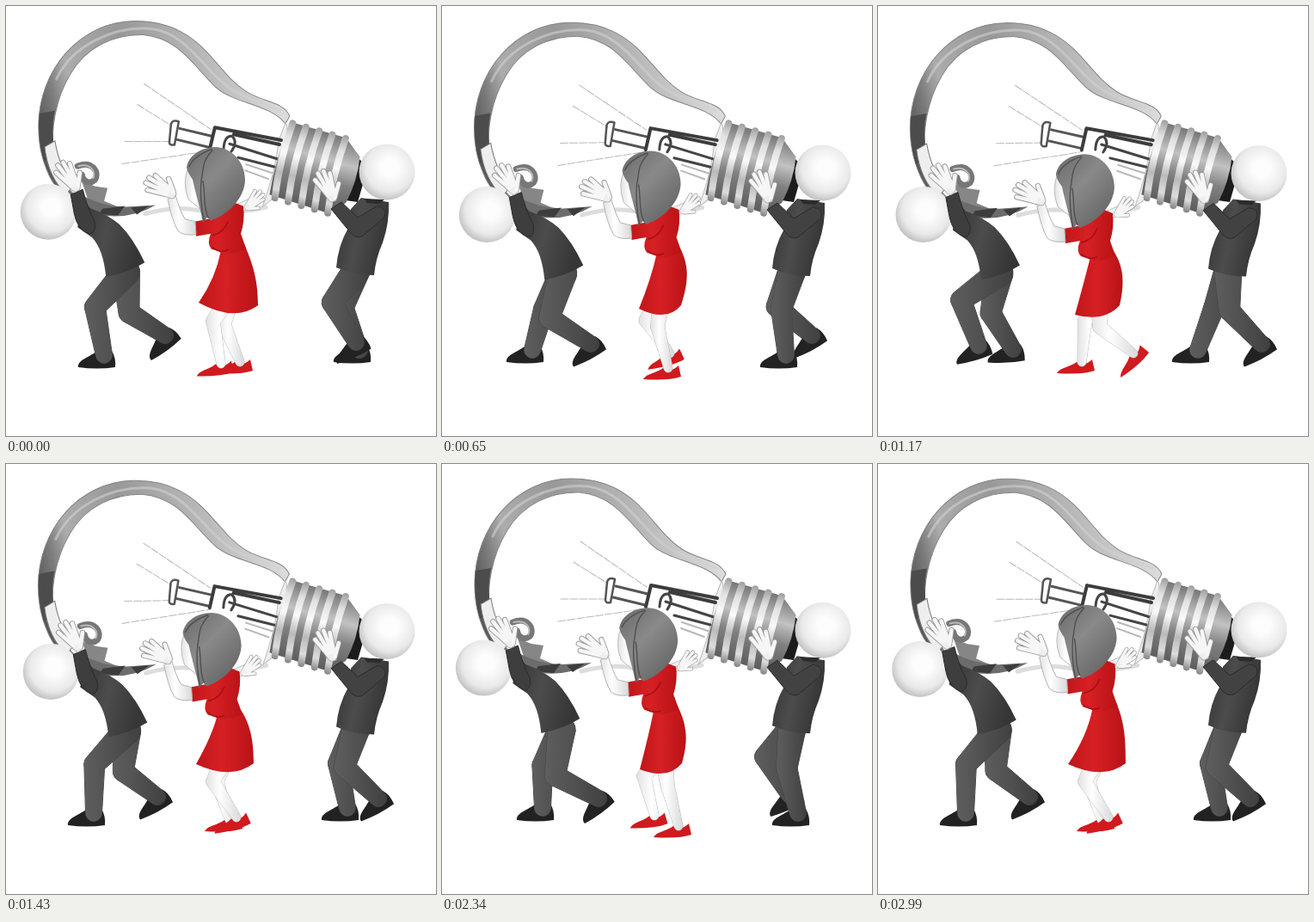
Recreate the animation shown at these times as an HTML page. Size 500 by 500 pixels, loop 3.12 s.

```html
<!DOCTYPE html>
<html>
<head>
<meta charset="utf-8">
<style>
  html, body { margin: 0; width: 100%; height: 100%; overflow: hidden; background: #fff; }
  svg { display: block; width: 100vw; height: 100vh; }
  .line { fill: none; stroke-linecap: round; stroke-linejoin: round; }
</style>
</head>
<body>
<svg viewBox="0 0 500 500">
  <defs>
    <radialGradient id="ball" cx=".55" cy=".42" r=".6">
      <stop offset=".25" stop-color="#fdfdfd"/><stop offset=".72" stop-color="#e9e9e9"/><stop offset="1" stop-color="#bebebe"/>
    </radialGradient>
    <linearGradient id="suit" x2="1" y2=".3">
      <stop stop-color="#333"/><stop offset=".5" stop-color="#4c4c4c"/><stop offset="1" stop-color="#363636"/>
    </linearGradient>
    <linearGradient id="cloth">
      <stop stop-color="#5e5e5e"/><stop offset=".5" stop-color="#505050"/><stop offset="1" stop-color="#404040"/>
    </linearGradient>
    <linearGradient id="skin">
      <stop stop-color="#e2e2e2"/><stop offset=".4" stop-color="#fff"/><stop offset="1" stop-color="#d8d8d8"/>
    </linearGradient>
    <linearGradient id="red">
      <stop stop-color="#c0161a"/><stop offset=".45" stop-color="#d62024"/><stop offset="1" stop-color="#b81216"/>
    </linearGradient>
    <linearGradient id="hair" x2=".8" y2="1">
      <stop stop-color="#6a6a6a"/><stop offset=".45" stop-color="#898989"/><stop offset="1" stop-color="#626262"/>
    </linearGradient>
    <linearGradient id="glass" gradientUnits="userSpaceOnUse" x1="40" y1="170" x2="325" y2="100">
      <stop stop-color="#505050"/><stop offset=".1" stop-color="#7c7c7c"/><stop offset=".18" stop-color="#acacac"/>
      <stop offset=".42" stop-color="#989898"/><stop offset=".7" stop-color="#b6b6b6"/><stop offset="1" stop-color="#dedede"/>
    </linearGradient>
    <linearGradient id="metal" gradientUnits="userSpaceOnUse" x1="0" y1="-48" x2="0" y2="50">
      <stop stop-color="#9a9a9a"/><stop offset=".2" stop-color="#e0e0e0"/><stop offset=".42" stop-color="#fafafa"/>
      <stop offset=".65" stop-color="#bababa"/><stop offset=".85" stop-color="#dcdcdc"/><stop offset="1" stop-color="#828282"/>
    </linearGradient>
    <linearGradient id="groove" gradientUnits="userSpaceOnUse" x1="0" y1="-48" x2="0" y2="50">
      <stop stop-color="#6c6c6c"/><stop offset=".35" stop-color="#c2c2c2"/><stop offset=".6" stop-color="#808080"/><stop offset="1" stop-color="#585858"/>
    </linearGradient>
    <path id="fingers" d="M-3 -4L-10 -25M0 -4L-4 -31M3 -4L3 -31M5 -4L9 -26M4 2L14 -11"/>
    <g id="hand" class="line">
      <use href="#fingers" stroke="#999" stroke-width="6.4"/>
      <path d="M-5 -13Q-7 0 -2 6L4 6Q9 -3 7 -13Z" fill="#eee" stroke="#b0b0b0"/>
      <use href="#fingers" stroke="#f6f6f6" stroke-width="4.6"/>
    </g>
  </defs>

  <g id="bulb">
    <path d="M330 128C323 111 299 112 279 99C250 80 239 48 203 29C188 21 172 17 150 17C88 17 38 72 38 140
      C38 164 43 180 50 196C57 211 70 225 86 233L91 228C73 217 59 195 56 172C51 145 58 106 76 77
      C94 47 126 32 160 33C203 37 220 72 244 94C266 114 308 114 325 137Z" fill="url(#glass)" stroke="#858585"/>
    <path class="line" d="M59 84C77 45 126 22 170 26C214 32 232 79 266 99Q285 109 319 121" stroke="#d0d0d0" stroke-width="3" opacity=".6"/>
    <path d="M39 124Q36 150 44 180L57 170Q52 142 57 121Z" fill="#4c4c4c"/>
    <path d="M45 163L57 156Q62 189 80 206L70 218Q49 199 45 163Z" fill="#eee" stroke="#777"/>
    <path d="M88 203L104 209L118 211L114 226L130 233L98 233Z" fill="#868686"/>
    <path d="M86 218Q112 233 140 233L174 231Q146 247 115 243Q94 239 83 231Z" fill="#6c6c6c"/>
    <path d="M112 235L138 232L130 243L108 241ZM145 234L166 232L152 242Z" fill="#3c3c3c"/>
    <path class="line" d="M162 241Q192 233 215 236Q260 244 302 234" stroke="#ddd" stroke-width="5"/>
    <path d="M325 136Q329 139 325 158L309 225L298 233Q314 190 317 157Z" fill="#eee" stroke="#bbb"/>
    <g class="line" stroke="#b8b8b8">
      <path d="M161 90L238 143M153 114L193 139M138 157L192 157M135 183L238 168" stroke-dasharray="9 2"/>
      <path d="M192 137Q194 131 201 134L196 161Q190 162 190 158Z" stroke="#555" stroke-width="2.5"/>
      <path d="M202 142L239 151M199 155L236 164" stroke="#555" stroke-width="3"/>
      <path d="M237 166L243 141L320 156M265 149L318 161" stroke="#3c3c3c" stroke-width="4"/>
      <path d="M253 166Q254 150 263 151Q270 158 262 169M260 160L316 178M270 176L312 187" stroke="#444" stroke-width="3"/>
      <path d="M279 184L309 194M278 191L305 201" stroke-width="2"/>
    </g>
  </g>

  <g transform="translate(357 188) rotate(16)">
    <path d="M48 -25L61 -18L61 24L47 26Z" fill="#1c1c1c"/>
    <path d="M30 -42L49 -27Q54 0 48 29L30 46Z" fill="url(#groove)"/>
    <path d="M-38 -44Q-46 0 -40 44L30 46L30 -44Z" fill="url(#groove)"/>
    <g id="threads" class="line" stroke="url(#metal)" stroke-width="8"></g>
  </g>

  <g id="legs0"></g>
  <g id="left">
    <path class="line" d="M84 187C101 180 110 194 104 203C97 209 90 204 89 197" stroke="#777" stroke-width="7"/>
    <path class="line" d="M85 187C99 183 106 194 102 201" stroke="#bbb" stroke-width="2"/>
    <path d="M90 226L99 236Q119 243 133 255Q149 271 162 299Q143 311 117 316Q114 284 101 270L84 258Z" fill="url(#suit)"/>
    <circle cx="50" cy="240" r="32.5" fill="url(#ball)"/>
    <path d="M76 220L90 214Q96 238 104 252Q106 264 98 266Q84 262 80 242Z" fill="#3e3e3e" stroke="#2b2b2b"/>
    <use href="#hand" transform="translate(80 211) rotate(-30)"/>
  </g>

  <g id="legs2"></g>
  <g id="right">
    <path d="M401 236L413 223L445 228Q446 252 438 275Q430 293 428 313Q403 313 384 304Q386 279 398 258Z" fill="url(#suit)"/>
    <path d="M416 224L440 225L434 230L420 229Z" fill="#2c2c2c"/>
    <circle cx="443" cy="193" r="32.5" fill="url(#ball)"/>
    <path d="M378 236L390 228L409 246L431 233Q444 234 440 246L414 268Q406 271 400 263Z" fill="#424242" stroke="#2c2c2c"/>
    <use href="#hand" transform="translate(378 222) rotate(-22)"/>
  </g>

  <g id="legs1"></g>
  <path id="skirt" fill="url(#red)"/>
  <g id="woman">
    <path d="M268 231L284 224L287 233L274 240Z" fill="#f2f2f2" stroke="#bbb"/>
    <use href="#hand" transform="translate(281 233) rotate(48) scale(.72)"/>
    <path d="M219 251L240 247L266 229L276 233Q278 250 273 265L279 282Q264 290 251 288Q250 286 239 283Q233 277 238 265L221 268Z" fill="url(#red)"/>
    <path class="line" d="M240 267Q253 264 258 251M240 281Q249 288 258 284" stroke="#a50f15" stroke-width="1.5"/>
    <path d="M188 225L197 220Q202 238 208 248L220 251L221 266Q207 268 200 262Q193 250 188 225Z" fill="url(#skin)" stroke="#b4b4b4"/>
    <use href="#hand" transform="translate(191 219) rotate(-58)"/>
    <path d="M213 186Q204 204 212 225L228 238L235 190Z" fill="url(#skin)" stroke="#bbb"/>
    <path d="M237 165C256 161 278 177 278 203C277 223 260 242 238 250L234 246L229 252C226 235 220 217 217 202Q211 194 210 188C212 175 224 167 237 165Z" fill="url(#hair)"/>
    <path class="line" d="M240 168C227 182 230 190 227 203Q225 224 230 250M229 204C232 220 229 235 235 246M239 167Q218 175 213 187" stroke="#505050" stroke-width="1.4"/>
  </g>
</svg>

<script>
const $ = id => document.getElementById(id);
const STEP = 130, STEPS = 24;

// One stride in twelve steps, beginning where the foot lands: ankle position and shoe tilt.
const manGait = {
  x: [102, 114, 127, 141, 154, 164, 173, 182, 160, 134, 117, 103],
  y: [406, 406, 406, 406, 405, 400, 393, 389, 389, 391, 395, 403],
  tilt: [0, 0, 0, 0, -3, -14, -28, -36, -28, -24, -16, 0]
};
const womanGait = {
  x: [240, 251, 263, 275, 286, 294, 297, 286, 268, 250, 234, 230],
  y: [421, 421, 421, 421, 418, 411, 404, 404, 411, 416, 418, 418],
  tilt: [0, 0, 0, 0, -10, -25, -38, -28, -12, -3, 3, 6]
};
const hem = {
  left: [224, 221, 218, 217, 223, 229, 230, 231, 231, 229, 225, 221],
  right: [293, 286, 278, 272, 274, 278, 279, 280, 281, 281, 284, 288],
  y: [345, 347, 349, 350, 351, 352, 355, 357, 357, 359, 356, 349]
};

const manShoe = 'M-30 14C-31 6 -19 3 -9 -4L9 -5Q14 3 13 14Q-8 17 -30 14Z';
const womanShoe = 'M-29 13C-25 6 -14 6 -6 0Q3 6 12 -3L15 10Q0 15 -29 13Z';
const man = { gait: manGait, shoe: manShoe, color: '#222', fill: 'url(#cloth)', edge: '#444', widths: [16, 12, 9.5] };
const walkers = [
  { ...man, shift: 0, land: 11, bones: [54, 57], far: { size: .87, x: 3, y: -6 } },
  { gait: womanGait, shoe: womanShoe, color: '#d01a1e', fill: 'url(#skin)', edge: '#bbb', widths: [11, 8, 5],
    shift: 0, land: 3, bones: [38, 50], far: { size: .95, x: -3, y: -7 } },
  { ...man, shift: 273, land: 3, bones: [46, 54], far: { size: .98, x: -3, y: -6 } }
];
const NEAR = { size: 1, x: 0, y: 0 };

function taper([ax, ay], [bx, by], ra, rb) {
  const a = Math.atan2(by - ay, bx - ax), nx = -Math.sin(a), ny = Math.cos(a);
  return `M${ax + nx * ra} ${ay + ny * ra}A${ra} ${ra} 0 0 1 ${ax - nx * ra} ${ay - ny * ra}` +
    `L${bx - nx * rb} ${by - ny * rb}A${rb} ${rb} 0 0 1 ${bx + nx * rb} ${by + ny * rb}Z`;
}

// The knee always bends towards the left, the walking direction.
function kneeOf([hx, hy], [fx, fy], thigh, shin) {
  const dx = fx - hx, dy = fy - hy, d = Math.hypot(dx, dy);
  const along = (thigh * thigh - shin * shin + d * d) / (2 * d);
  const out = Math.sqrt(Math.max(0, thigh * thigh - along * along));
  return [hx + (dx * along - dy * out) / d, hy + (dy * along + dx * out) / d];
}

function leg(w, hip, step, side) {
  const g = (step - w.land + (side === NEAR ? 0 : 6) + STEPS) % 12;
  const foot = [w.gait.x[g] + w.shift + side.x, w.gait.y[g] + side.y];
  const knee = kneeOf(hip, foot, w.bones[0] * side.size, w.bones[1] * side.size);
  const [top, mid, low] = w.widths;
  return `<path d="${w.shoe}" fill="${w.color}" transform="translate(${foot}) rotate(${w.gait.tilt[g]})"/>
    <path d="${taper(hip, knee, top, mid)}${taper(knee, foot, mid, low)}" fill="${w.fill}" stroke="${w.edge}" paint-order="stroke"/>`;
}

function draw(step) {
  const wave = lag => Math.sin((step - lag) * 2 * Math.PI / STEPS);
  const move = (id, x, y) => $(id).setAttribute('transform', `translate(${x} ${y})`);
  const phase = step % 12, left = hem.left[phase], right = hem.right[phase], y = hem.y[phase];
  const sway = 2.8 * wave(-4) - 2.4, bob = 4 + 4.5 * wave(5);

  $('bulb').setAttribute('transform', `rotate(${-.4 - .45 * wave(2)} 330 180)`);
  move('left', .5 + 2.5 * wave(2), 3 * wave(1));
  move('right', 0, .7 + .9 * wave(4));
  move('woman', sway, bob);
  const waist = `${250 + sway} ${284 + bob}`;
  $('skirt').setAttribute('d', `M${waist}L${277 + sway} ${277 + bob}` +
    `C${287 + sway} 300 ${Math.max(right, 288)} 318 ${right} 348` +
    `Q${(left + right) / 2 + 8} 368 ${left} ${y}Q${244 + sway} 316 ${waist}Z`);

  const hips = [[140 + wave(2), 310 + wave(1)], [(left + right) / 2 + 3, 335], [407, 308]];
  walkers.forEach((w, i) => {
    $('legs' + i).innerHTML = leg(w, hips[i], step, w.far) + leg(w, hips[i], step, NEAR);
  });
}

$('threads').innerHTML = [-36, -20, -4, 12, 28].map(x =>
  `<path d="M${x - 1} -43Q${x - 4} 0 ${x + 3} 46"/>`).join('');

function tick() {
  draw(Math.floor(performance.now() / STEP) % STEPS);
  requestAnimationFrame(tick);
}
tick();
</script>
</body>
</html>
```
